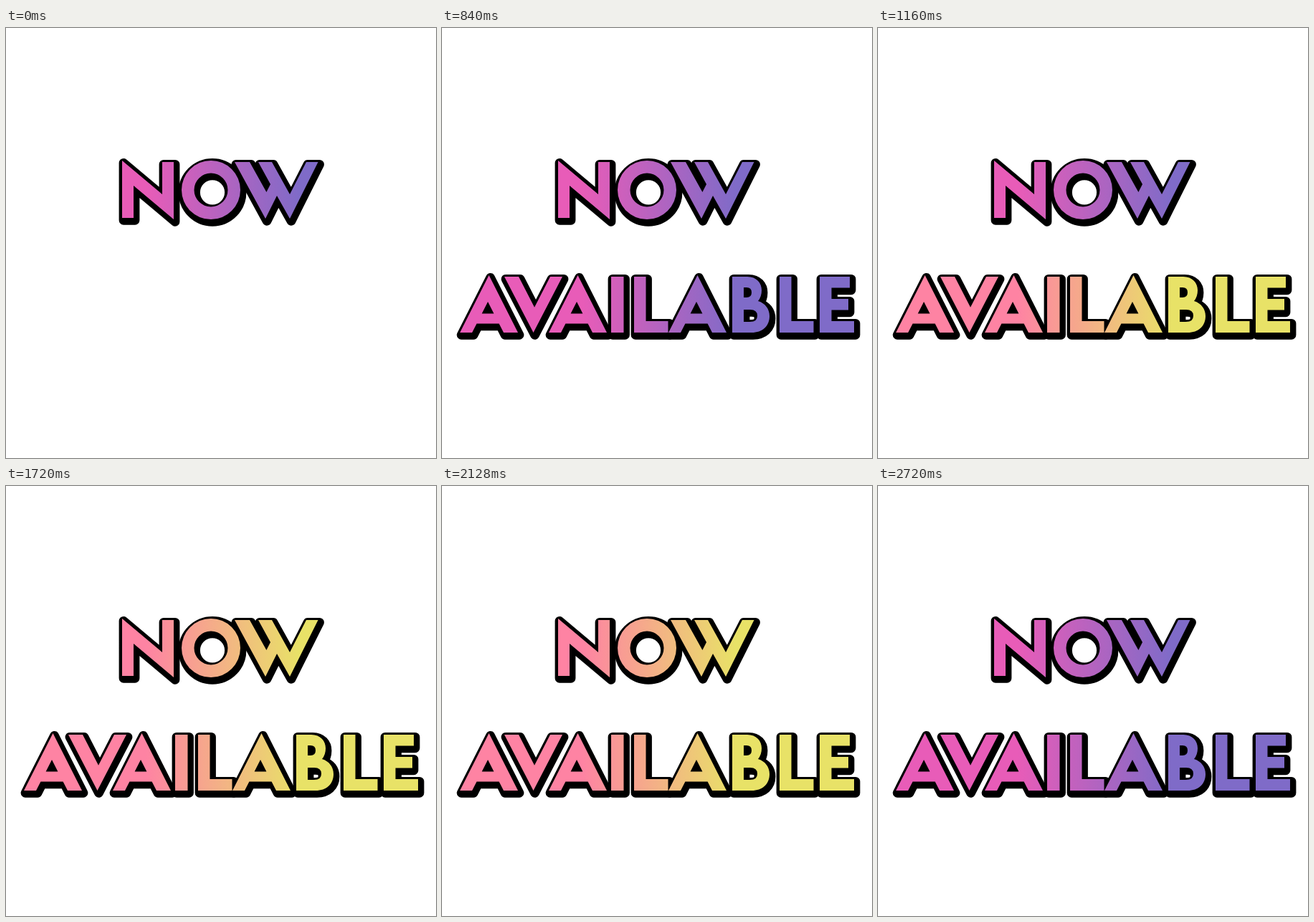
An HTML page that plays this animation: 600x600 px, repeating every 3000 ms.

```html
<!DOCTYPE html>
<html lang="en">
<head>
<meta charset="utf-8">
<title>Now available</title>
<style>
html, body { margin: 0; width: 100%; height: 100%; overflow: hidden; background: #fff; }
svg { display: block; width: 100vw; height: 100vh; }
.edge { fill: #000; stroke: #000; stroke-width: 12.8; stroke-linejoin: round; }
path { fill-rule: evenodd; }
</style>
</head>
<body>
<svg id="stage" viewBox="0 0 600 600" role="img" aria-label="NOW AVAILABLE">
  <defs>
    <linearGradient id="cool" gradientUnits="userSpaceOnUse" x1="195" y1="0" x2="410" y2="0">
      <stop offset="0" stop-color="#e85cb8"/><stop offset="1" stop-color="#7f6bc8"/>
    </linearGradient>
    <linearGradient id="warm" gradientUnits="userSpaceOnUse" x1="195" y1="0" x2="410" y2="0">
      <stop offset="0" stop-color="#fe83a3"/><stop offset="1" stop-color="#e8e267"/>
    </linearGradient>
  </defs>
</svg>
<script>
const LOOP = 3000;
const stage = document.getElementById('stage');

// Letter outlines; the wide word has its cap line at 347 and baseline at 425.
const letterA = x => `M${x} 425L${x + 40.5} 345L${x + 81} 425H${x + 61}L${x + 54.6} 412.5H${x + 23.4}L${x + 17} 425Z` +
  `M${x + 30.6} 398.5H${x + 47.4}L${x + 39} 382Z`;
const letterV = x => `M${x} 347H${x + 20}L${x + 42} 389.7L${x + 64} 347H${x + 81}L${x + 40.5} 425Z`;
const letterI = x => `M${x} 347h17.5V425h-17.5Z`;
const letterL = x => `M${x} 347h16.5V409h31V425h-47.5Z`;
const letterE = x => `M${x} 347h42v15.5h-25.5v15.5h23.5v15.5h-23.5V409h31.5V425h-48Z`;
const letterB = x => `M${x} 425V347h21C${x + 34} 347 ${x + 41} 356 ${x + 41} 366` +
  `Q${x + 41} 375 ${x + 36} 381C${x + 46} 384 ${x + 52} 392 ${x + 52} 402C${x + 52} 416 ${x + 42} 425 ${x + 27} 425Z` +
  `M${x + 16} 362h4q7 0 7 7t-7 7h-4ZM${x + 16} 393h9q10 0 10 8.5t-10 8.5h-9Z`;
const ring = (x, y, r) => `M${x - r} ${y}a${r} ${r} 0 1 0 ${2 * r} 0a${r} ${r} 0 1 0 ${-2 * r} 0Z`;

const nowShapes = [
  'M162 265V185L218 232V187H234V267L178 220V265Z',
  ring(286, 226, 41) + ring(286, 226, 23.5),
  'M319 187H340L363.4 229L369 218L352 187H371L396 232L419 187H435.5L396 266L378 234L362 266Z'
];
const availableShapes = [
  letterA(25), letterV(87), letterA(149), letterI(236), letterL(268),
  letterA(316), letterB(405), letterL(471), letterE(527)
];

function add(parent, tag, attrs) {
  const el = document.createElementNS('http://www.w3.org/2000/svg', tag);
  for (const key in attrs) el.setAttribute(key, attrs[key]);
  return parent.appendChild(el);
}

function makeWord(shapes) {
  const group = add(stage, 'g', {});
  const edge = add(group, 'g', { class: 'edge', transform: 'translate(2 3.3)' });
  const face = add(group, 'g', {});
  for (const d of shapes) {
    add(edge, 'path', { d });
    add(face, 'path', { d });
  }
  return { group, face };
}

const nowWord = makeWord(nowShapes);
const availableWord = makeWord(availableShapes);
const paint = (word, warm) => word.face.setAttribute('fill', warm ? 'url(#warm)' : 'url(#cool)');

function draw(ms) {
  const t = ms % LOOP;
  availableWord.group.setAttribute('visibility', t < 360 ? 'hidden' : 'visible');
  paint(availableWord, t >= 1160 && t < 2720);
  paint(nowWord, t >= 1720 && t < 2400);
}

let start = null;
function tick(now) {
  if (start === null) start = now;
  draw(now - start);
  requestAnimationFrame(tick);
}
draw(0);
requestAnimationFrame(tick);
</script>
</body>
</html>
```
